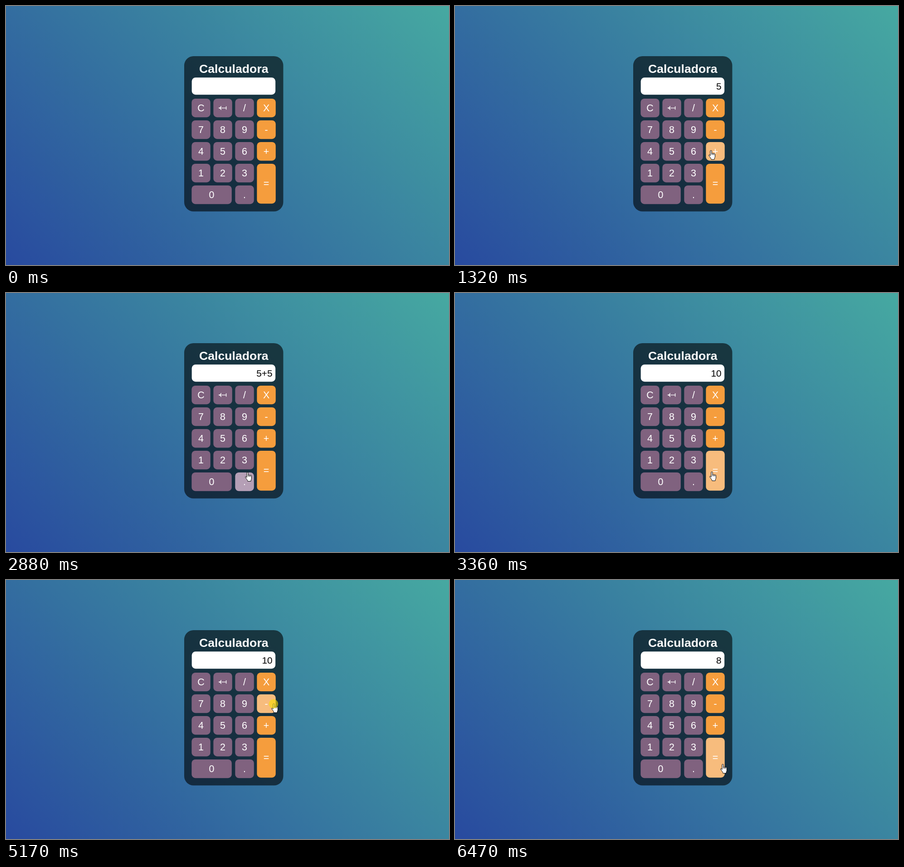
Recreate the animation shown at these times as an HTML page. Size 977 by 573 pixels, loop 8000 ms.

```html
<!DOCTYPE html>
<html lang="pt">
<head>
<meta charset="utf-8">
<title>Calculadora</title>
<style>
  html, body { margin: 0; width: 100%; height: 100%; overflow: hidden; }
  body { background: linear-gradient(45deg, #284a9f, #46a9a1); }
  svg { display: block; width: 977px; height: 573px; }
  text { font: 21.5px "Liberation Sans", Arial, sans-serif; text-anchor: middle; fill: #fff; }
  .title { font-size: 26.67px; font-weight: bold; }
  .value { font-size: 20.83px; text-anchor: end; fill: #000; }
  .key rect { fill: #80627f; }
  .key.hover rect { fill: #b59fb6; }
  .key.accent rect { fill: #f59d3d; }
  .key.accent.hover rect { fill: #f7bc7d; }
  .back { fill: none; stroke: #fff; stroke-width: 1.4; }
  .cursor { fill: #fff; stroke: #000; stroke-linejoin: round; }
</style>
</head>
<body>
<svg viewBox="0 0 977 573">
  <rect x="393" y="111" width="218.5" height="343.5" rx="20.5" fill="#000" fill-opacity=".6"/>
  <text class="title" x="502.3" y="148">Calculadora</text>
  <rect x="409.7" y="158.3" width="184.5" height="38" rx="8.3" fill="#fff"/>
  <text class="value" id="value" x="587.6" y="184.5"></text>
  <g id="keys"></g>
  <g id="pointer" class="cursor">
    <path id="arrow" d="M.5 .5V16.5L4.2 13 6.6 18.8 9.2 17.7 6.8 12.2H11.8Z"/>
    <g id="hand" transform="translate(-5 -1)">
      <path d="M4 12.3V2a1.5 1.5 0 0 1 3 0V7.2a1.4 1.4 0 0 1 2.6.4 1.4 1.4 0 0 1 2.5.6 1.25 1.25 0 0 1 2.4.9V14C14.5 16.5 13 17 13 20.5H6C6 17.5 3 15.5 1 12 .2 10.2 2 9 4 12.3Z"/>
      <path d="M7 7v3.2M9.6 7.6v2.8M12.1 8.3v2.3" fill="none"/>
    </g>
    <circle id="press" r="10.2" fill="#f8e000" fill-opacity=".6" stroke="none"/>
  </g>
</svg>
<script>
const LOOP = 8000, STEP = 70;
const PITCH = 48, SIZE = 41.4, LEFT = 409.4, TOP = 204.9;
const $ = id => document.getElementById(id);

const keys = [];
function addKey(label, col, row, cols = 1, rows = 1) {
  const x = LEFT + PITCH * col, y = TOP + PITCH * row;
  // Wide and tall keys sit slightly inside the grid.
  const w = SIZE + (cols - 1) * (PITCH - 1), h = SIZE + (rows - 1) * (PITCH - 1);
  const cx = x + w / 2, cy = y + h / 2;
  const group = document.createElementNS("http://www.w3.org/2000/svg", "g");
  const face = label === "back"
    ? `<path class="back" transform="translate(${cx} ${cy})" d="M-3.4-4.2Q-4.5-1-8 0-4.5 1-3.4 4.2M-8 0H7.5M7.5-3.7v7.4"/>`
    : `<text x="${cx}" y="${cy + 7.2}">${label}</text>`;
  group.setAttribute("class", col === 3 ? "key accent" : "key");
  group.innerHTML = `<rect x="${x}" y="${y}" width="${w}" height="${h}" rx="8.3"/>${face}`;
  $("keys").append(group);
  keys.push({ group, x, y, w, h });
}

[["C", "back", "/", "X"], [7, 8, 9, "-"], [4, 5, 6, "+"], [1, 2, 3]]
  .forEach((labels, row) => labels.forEach((label, col) => addKey(label, col, row)));
addKey("0", 0, 4, 2);
addKey(".", 2, 4);
addKey("=", 3, 3, 1, 2);

// Where the pointer rests; a key is released as the pointer leaves.
const stops = [
  { x: 718, y: 498, arrive: 130 },
  { x: 486, y: 323, arrive: 690, leave: 970, key: "5" },
  { x: 570, y: 320, arrive: 1390, leave: 1720, key: "+" },
  { x: 486, y: 318, arrive: 2070, leave: 2670, key: "5" },
  { x: 532, y: 397, arrive: 2880 },
  { x: 566, y: 396, arrive: 3160, leave: 3300, key: "=" },
  { x: 566, y: 396, arrive: 4020 },
  { x: 556, y: 396, arrive: 4090, leave: 4280 },
  { x: 563, y: 379, arrive: 4350 },
  { x: 590, y: 274, arrive: 4840, leave: 5240, key: "-" },
  { x: 482, y: 364, arrive: 5590, leave: 5860, key: "2" },
  { x: 590, y: 408, arrive: 6210, leave: 6470, key: "=" }
];
const leaveTime = stop => stop.leave || stop.arrive;

const sum = text => String(text.split(/(?=[+-])/).reduce((total, n) => total + Number(n), 0));
const valueAt = t => stops
  .filter(s => s.key && s.leave <= t)
  .reduce((text, s) => s.key === "=" ? sum(text) : text + s.key, "");

function pointerAt(t) {
  const i = stops.findLastIndex(s => s.arrive <= t);
  const from = stops[i], to = stops[i + 1], leave = leaveTime(from);
  if (!to || t < leave) return [from.x, from.y];
  const p = Math.floor((t - leave) / STEP) * STEP / (to.arrive - leave);
  const ease = p * p * (3 - 2 * p);
  return [from.x + (to.x - from.x) * ease, from.y + (to.y - from.y) * ease].map(Math.round);
}

// The last key is tapped too briefly to show a highlight.
const pressedAt = t => stops.slice(0, -1)
  .some(s => s.key && t >= s.leave - STEP && t < s.leave);

const show = (el, on) => { el.style.display = on ? "" : "none"; };

function draw(t) {
  const visible = t >= stops[0].arrive;
  const [x, y] = visible ? pointerAt(t) : [0, 0];
  let over = false;
  for (const k of keys) {
    const hit = x >= k.x && x <= k.x + k.w && y >= k.y && y <= k.y + k.h;
    k.group.classList.toggle("hover", hit);
    over = over || hit;
  }
  $("value").textContent = valueAt(t);
  $("pointer").setAttribute("transform", `translate(${x} ${y})`);
  show($("pointer"), visible);
  show($("hand"), over);
  show($("arrow"), !over);
  show($("press"), pressedAt(t));
}

const origin = performance.now();
function tick() {
  draw((performance.now() - origin) % LOOP);
  requestAnimationFrame(tick);
}
tick();
</script>
</body>
</html>
```
